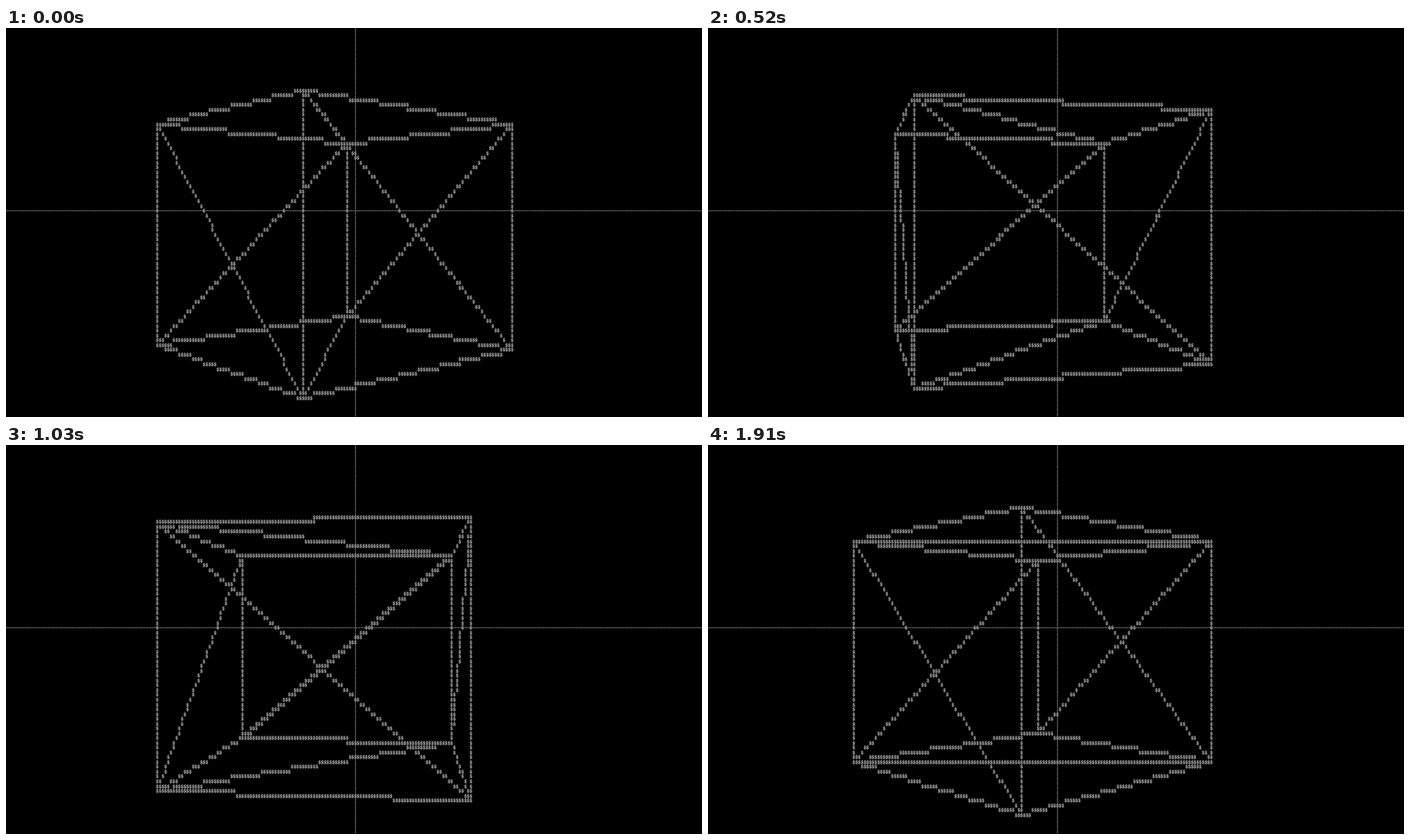
Animation, 800 px wide and 448 px high, one loop 1940 ms. Source, as an HTML page:

```html
<!DOCTYPE html>
<html lang="en">
<head>
<meta charset="utf-8">
<title>Character cube</title>
<style>
  html, body { margin: 0; width: 100%; height: 100%; overflow: hidden; background: #000; }
  svg { display: block; width: 800px; height: 448px; }
  text {
    font: 52.52px "DejaVu Sans Mono", "Liberation Mono", monospace;
    fill: #868686;
    stroke: #868686;
    stroke-width: 5;
    white-space: pre;
    text-rendering: geometricPrecision;
  }
  line { stroke: #606060; stroke-width: 11; }
</style>
</head>
<body>
<svg viewBox="0 0 8000 4480" xmlns="http://www.w3.org/2000/svg">
  <line x1="0" y1="2105" x2="8000" y2="2105" stroke-dasharray="28 3.62"/>
  <line x1="4017" y1="0" x2="4017" y2="4480" stroke-dasharray="52 3.3"/>
  <g id="screen"></g>
</svg>
<script>
const LOOP = 1940, FPS = 33;
const COLS = 254, ROWS = 82, CELL_W = 31.62, CELL_H = 55.3;
const START = -0.0745, SPEED = -Math.PI / 4;
const CENTER = { x: 127.46, y: 38.5 }, OFFSET = { x: -0.2, y: 0.2 };
const FOCAL = 115.1, DISTANCE = 5;
const BLANK = '\u00a0';

const screen = document.getElementById('screen');
const rows = Array.from({ length: ROWS }, (_, r) => {
  const row = document.createElementNS('http://www.w3.org/2000/svg', 'text');
  row.setAttribute('x', -CELL_W / 2);
  row.setAttribute('y', r * CELL_H + 19);
  return screen.appendChild(row);
});

// Corner k of the cube; side is -1 for the top, 1 for the bottom.
function project(k, side, angle) {
  const a = angle + k * Math.PI / 2;
  const scale = FOCAL / (DISTANCE - Math.SQRT2 * Math.cos(a));
  return {
    x: Math.round(CENTER.x + 2 * scale * (Math.SQRT2 * Math.sin(a) + OFFSET.x)),
    y: Math.round(CENTER.y + scale * (side + OFFSET.y))
  };
}

// Steps along the longer axis; ties round toward the end point.
function plotLine(grid, p, q) {
  const dx = q.x - p.x, dy = q.y - p.y;
  const steps = Math.max(Math.abs(dx), Math.abs(dy), 1);
  const along = (d, i) => Math.sign(d) * Math.round(Math.abs(d) * i / steps);
  for (let i = 0; i <= steps; i++) {
    grid[p.y + along(dy, i)][p.x + along(dx, i)] = '$';
  }
}

// Two triangles share each edge and trace it in opposite directions.
function plotEdge(grid, p, q) {
  plotLine(grid, p, q);
  plotLine(grid, q, p);
}

function draw(frame) {
  const angle = START + SPEED * frame / FPS;
  const grid = rows.map(() => Array(COLS).fill(BLANK));
  const corners = side => [0, 1, 2, 3].map(k => project(k, side, angle));
  const top = corners(-1), bottom = corners(1);
  for (let k = 0; k < 4; k++) {
    const next = (k + 1) % 4;
    plotEdge(grid, top[k], top[next]);
    plotEdge(grid, bottom[k], bottom[next]);
    plotEdge(grid, top[k], bottom[k]);
    plotEdge(grid, top[k], bottom[next]);
  }
  plotEdge(grid, top[0], top[2]);
  plotEdge(grid, bottom[0], bottom[2]);
  grid.forEach((cells, r) => {
    const line = cells.join('');
    if (rows[r].textContent !== line) rows[r].textContent = line;
  });
}

let shown = -1;
const origin = performance.now();
function tick() {
  const t = (performance.now() - origin) % LOOP;
  // Frame starts fall on the nearest hundredth of a second.
  const frame = Math.min(63, Math.floor((t + 5) * FPS / 1000));
  if (frame !== shown) draw(shown = frame);
  requestAnimationFrame(tick);
}
tick();
</script>
</body>
</html>
```
